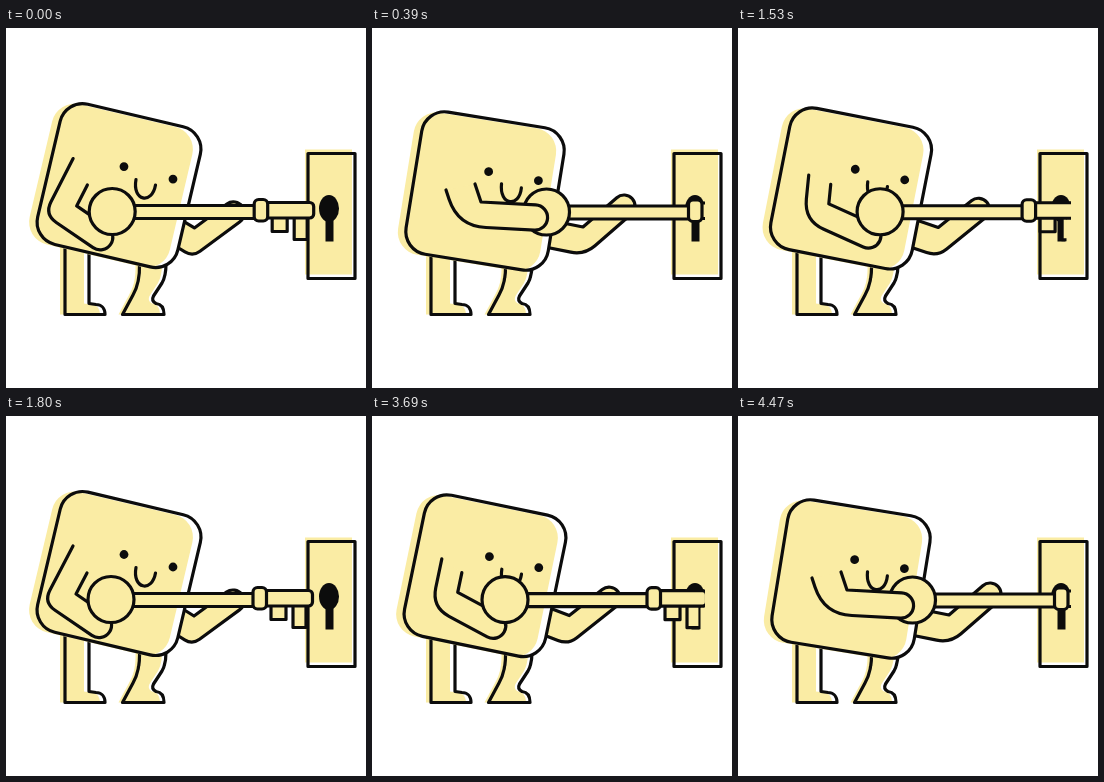
Write an HTML page that moves like this. It is 360x360 px and loops after 4500 ms.

```html
<!DOCTYPE html>
<html lang="en">
<head>
<meta charset="utf-8">
<title>Key and lock</title>
<style>
html, body { margin: 0; height: 100%; overflow: hidden; background: #fff; }
svg { display: block; width: 100vw; height: 100vh; }
.line { stroke: #0c0c0c; stroke-width: 3.2; stroke-linecap: round; stroke-linejoin: round; fill: none; }
.fill { fill: #faeca4; }
.ink { fill: #0c0c0c; }
.white { fill: #fff; }
</style>
</head>
<body>
<svg viewBox="0 0 360 360">
  <defs>
    <rect id="box" x="41" y="85.500" width="144" height="144" rx="23" transform="rotate(13.3 113 157.5)"/>
    <path id="legL" d="M59 216V286.500H99C99 280 95 276.500 90 276.500L83 275.500V222"/>
    <path id="legR" d="M133.500 236C134 252 131 260 127 267L116.500 286.500H158C158 280 155 276 150 275.500Q145 273 147.500 268L156 255Q160 248 160 236"/>
    <rect id="plate" x="302" y="125.500" width="47" height="125"/>
    <clipPath id="inHole"><rect width="333" height="360"/></clipPath>
    <clipPath id="inSlot"><rect width="328.500" height="360"/></clipPath>
  </defs>

  <use href="#plate" class="fill" x="-3" y="-4"/>
  <use href="#plate" class="line"/>
  <ellipse class="ink" cx="323" cy="180.500" rx="10" ry="13.500"/>
  <rect class="ink" x="319.500" y="190" width="8" height="23.500"/>

  <use href="#legL" class="fill" x="-5"/>
  <use href="#legR" class="fill" x="-4"/>
  <use href="#legL" class="line"/>
  <use href="#legR" class="line"/>

  <path id="farArm" class="line fill"/>

  <g id="body">
    <use href="#box" class="white"/>
    <use href="#box" class="fill" x="-8"/>
    <use href="#box" class="line"/>
    <circle class="ink" cx="118" cy="138.500" r="4.400"/>
    <circle class="ink" cx="167" cy="151" r="4.400"/>
    <path class="line" d="M130 151.500C126 173 146 177 149.500 157"/>
  </g>

  <path id="armUnder" class="line fill"/>
  <g clip-path="url(#inSlot)">
    <g class="slide line">
      <rect class="fill" x="265" y="186" width="15" height="17.500"/>
      <rect class="fill" x="287" y="186" width="13" height="25.500"/>
    </g>
  </g>
  <g clip-path="url(#inHole)">
    <g class="slide line">
      <rect class="fill" x="120" y="177.500" width="132" height="13"/>
      <rect class="fill" x="254" y="174.500" width="52.500" height="15.500" rx="4"/>
      <rect class="fill" x="247" y="171.500" width="13.500" height="21.500" rx="4.500"/>
      <circle class="fill" cx="105" cy="183.500" r="23"/>
    </g>
  </g>
  <path id="armOver" class="line fill"/>
</svg>
<script>
const LOOP = 4500, MOVE = 400, REACH = 69.5;
const $ = id => document.getElementById(id);
const slides = document.querySelectorAll('.slide');

// Joints go from [key out] to [key in]; bow lowers the hand half way
const nearArm = {
  outer: [[67, 130], [74, 162]],
  inner: [[81, 157], [103, 156]],
  elbow: [[70, 178], [109, 174]],
  hand: [[93, 209], [163, 189.5]],
  radius: 12.6, round: [14, 28], bow: 9
};
const farArm = {
  outer: [[171, 219], [173, 219]],
  inner: [[172, 190], [181, 193]],
  elbow: [[188, 200], [211, 199]],
  hand: [[227, 185], [252, 178]],
  radius: 11, round: [9, 14], bow: 0
};

const ease = (t, start) => {
  const u = Math.min(1, Math.max(0, (t - start) / MOVE));
  return u * u * (3 - 2 * u);
};
const mix = (a, b, p) => a + (b - a) * p;
const mixPt = ([a, b], p) => [mix(a[0], b[0], p), mix(a[1], b[1], p)];
const add = (a, b, k) => [a[0] + b[0] * k, a[1] + b[1] * k];
const sub = (a, b) => add(a, b, -1);
const dot = (a, b) => a[0] * b[0] + a[1] * b[1];

// Outline of a bent arm of even width, open at the shoulder
function armPath(arm, p) {
  const r = arm.radius, bend = mix(...arm.round, p);
  const [outer, inner, elbow, hand] =
    [arm.outer, arm.inner, arm.elbow, arm.hand].map(pair => mixPt(pair, p));
  hand[1] += arm.bow * 4 * p * (1 - p);

  const upper = sub(elbow, inner);
  const up = upper.map(v => v / Math.hypot(...upper));
  const lower = sub(hand, elbow);
  const angle = Math.atan2(lower[1], lower[0]) - Math.asin(r / Math.hypot(...lower));
  const along = [Math.cos(angle), Math.sin(angle)];
  const side = [-along[1], along[0]];

  const palm = add(hand, side, r);
  const corner = add(outer, up, dot(sub(palm, outer), side) / dot(up, side));
  return `M${outer}L${add(corner, up, -bend)}Q${corner} ${add(corner, along, bend)}` +
    `L${palm}A${r} ${r} 0 0 0 ${add(hand, side, -r)}L${elbow}L${inner}`;
}

function draw(t) {
  const p = ease(t, -30) - ease(t, 1340) + ease(t, 3517);
  const near = armPath(nearArm, p);
  const over = p > 0.7;
  $('armUnder').setAttribute('d', over ? '' : near);
  $('armOver').setAttribute('d', over ? near : '');
  $('farArm').setAttribute('d', armPath(farArm, p));
  $('body').setAttribute('transform', `translate(0 ${5.5 * p}) rotate(${-4.1 * p} 113 157.5)`);
  slides.forEach(s => s.setAttribute('transform', `translate(${REACH * p} ${0.5 * p})`));
}

const start = performance.now();
function frame() {
  draw((performance.now() - start) % LOOP);
  requestAnimationFrame(frame);
}
frame();
</script>
</body>
</html>
```
